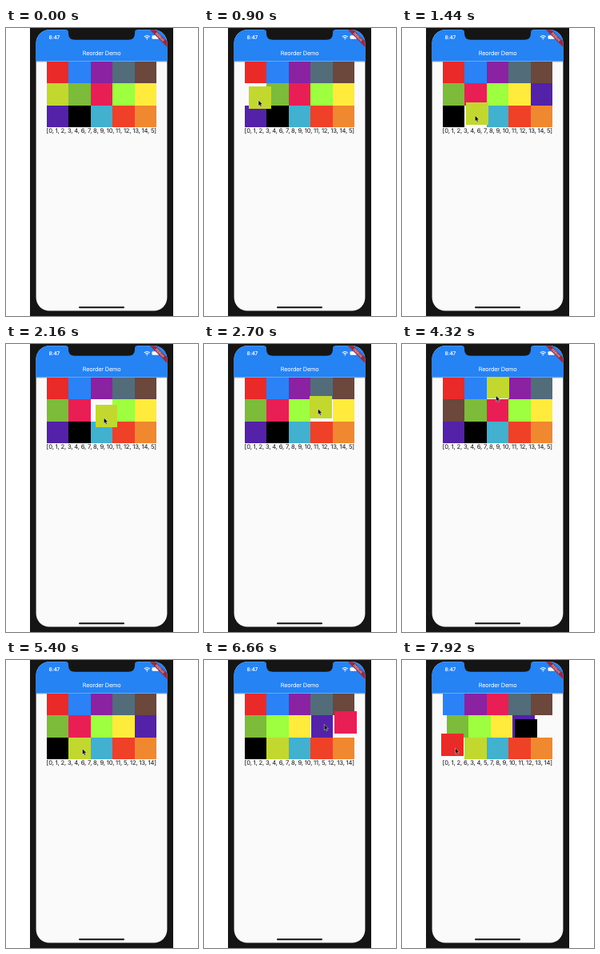
Write an HTML page that moves like this. It is 240 px wide and 360 px high and loops after 8 s.

```html
<!DOCTYPE html>
<html lang="en">
<head>
<meta charset="utf-8">
<title>Reorder Demo</title>
<style>
  html, body { margin: 0; width: 100%; height: 100%; overflow: hidden; background: #fff; }
  svg { display: block; width: 240px; height: 360px; }
  text { font: 7.65px Inter, "Open Sans", sans-serif; letter-spacing: -.19px; text-rendering: geometricPrecision; }
  .title { font-size: 7.35px; }
  .time { font-size: 6.5px; font-weight: 600; }
  .debug { font-size: 4px; font-weight: 700; letter-spacing: 0; }
  #tiles { shape-rendering: crispEdges; }
</style>
</head>
<body>
<svg viewBox="0 0 240 360">
  <defs>
    <clipPath id="screen"><rect x="37.6" y="2.2" width="163.800" height="351.300" rx="16.500"/></clipPath>
    <linearGradient id="shade" x2="0" y2="1">
      <stop stop-color="#000" stop-opacity=".28"/>
      <stop offset="1" stop-color="#000" stop-opacity="0"/>
    </linearGradient>
  </defs>
  <rect x="30" width="179" height="360" fill="#151515"/>
  <g clip-path="url(#screen)">
    <rect x="37" width="165" height="360" fill="#fafafa"/>
    <rect x="37" width="165" height="41.5" fill="#2583f3"/>
    <rect x="37" y="41.5" width="165" height="2" fill="url(#shade)"/>
    <text class="title" x="119.6" y="33.6" text-anchor="middle" fill="#fff">Reorder Demo</text>
    <text class="time" x="53.6" y="14" fill="#fff">8:47</text>
    <g fill="none" stroke="#fff" stroke-width="1.1">
      <path d="M173 11q3.3-3 6.6 0M174.5 12.4q1.8-1.6 3.6 0"/>
      <path d="M176.3 13.2v1.2"/>
    </g>
    <rect x="182.5" y="9.3" width="8.5" height="4.4" rx="1.2" fill="#fff"/>
    <g transform="translate(201 2.5) rotate(45)">
      <rect x="-25" y="9.8" width="50" height="5" fill="#982a40"/>
      <text class="debug" y="13.7" text-anchor="middle" fill="#e6c4cc">DEBUG</text>
    </g>
    <rect x="91" y="348.3" width="57" height="1.9" rx=".95" fill="#111"/>
  </g>
  <path d="M75 0V2.200q3 0 3 3V7q0 7.800 8 7.800h67q8 0 8-7.800V5.200q0-3 3-3V0z" fill="#151515"/>
  <text id="list" x="50.6" y="131.2" fill="#111"></text>
  <g id="tiles"></g>
  <path id="cursor" d="M0 0V7.2L1.6 5.700 2.7 8.2 4 7.600 2.900 5.200H5.100z" fill="#000" stroke="#fff" stroke-width=".45"/>
</svg>
<script>
const LOOP = 8000, STEP = 180, SHIFT = 200, TICK = 5;
const CELL = 27.5, COLS = 5, LEFT = 50.8, TOP = 41.6;
const colors = ['#e92a28', '#2a82f6', '#8a22a2', '#526c7a', '#6b473c',
  '#c2d82f', '#7dbb3a', '#e91e55', '#9dff3f', '#ffeb3b',
  '#5322a8', '#000', '#42b0cf', '#ee4128', '#f08830'];

const $ = id => document.getElementById(id);
const mix = (a, b, k) => a.map((v, i) => v + (b[i] - v) * k);
const smooth = k => k * k * (3 - 2 * k);
const place = (el, [x, y]) => el.setAttribute('transform', `translate(${x} ${y})`);
const identity = () => colors.map((_, i) => i);
const slot = i => [LEFT + CELL * (i % COLS), TOP + CELL * Math.floor(i / COLS)];

// Slot under the middle of a tile
const slotAt = ([x, y]) => {
  const cell = v => Math.floor(v / CELL + .5);
  return cell(y - TOP) * COLS + cell(x - LEFT);
};

// Each path glides through a few points: [time, [x, y]]
const drags = [
  { tile: 5, path: [[700, slot(5)], [1440, [80, 93]], [2700, [132, 65]], [4320, [106, 40.5]], [5220, slot(11)]] },
  { tile: 7, path: [[5940, slot(6)], [6660, [163, 64]], [7020, slot(3)]] },
  { tile: 0, path: [[7311, slot(0)], [7920, [49, 92]]] }
];
const pointer = [[700, [63, 86]], [1440, [91.3, 109.5]], [2700, [142.5, 81]], [4320, [117.5, 64.5]],
  [5220, [95.5, 111]], [5400, [95.5, 111]], [5940, [95, 86]], [6660, [150.3, 80.5]],
  [7311, [68, 60]], [7920, [66.5, 110]]];

function glide(path, t) {
  const i = path.findIndex(([time]) => time > t);
  if (i < 0) return path[path.length - 1][1];
  if (i === 0) return path[0][1];
  const [[t0, a], [t1, b]] = [path[i - 1], path[i]];
  return mix(a, b, smooth((t - t0) / (t1 - t0)));
}

function move(order, from, to) {
  order.splice(to, 0, order.splice(from, 1)[0]);
  return order;
}

const at = (s, t) => mix(s.from, s.to, Math.min(1, (t - s.start) / SHIFT));

// Replays the drags up to t: a dragged tile takes the slot it hovers, the others slide aside
function replay(t) {
  const order = identity();
  const state = order.map(i => ({ from: slot(i), to: slot(i), index: i, start: -SHIFT }));
  let list = move(identity(), 5, 14), held = -1;

  for (const { tile, path } of drags) {
    const begin = path[0][0], end = path[path.length - 1][0];
    if (t < begin) break;
    const first = order.indexOf(tile);
    for (let now = begin; now <= Math.min(t, end); now += TICK) {
      const target = slotAt(glide(path, now));
      if (target === order.indexOf(tile)) continue;
      move(order, order.indexOf(tile), target);
      order.forEach((id, i) => {
        if (state[id].index !== i) state[id] = { from: at(state[id], now), to: slot(i), index: i, start: now };
      });
    }
    held = t < end || tile === 0 ? tile : -1;
    if (held < 0) list = move(identity(), first, order.indexOf(tile));
  }

  const spots = state.map(s => at(s, t));
  if (held >= 0) spots[held] = glide(drags.find(d => d.tile === held).path, t);
  return { spots, list, held };
}

const tiles = colors.map(color => {
  const el = document.createElementNS('http://www.w3.org/2000/svg', 'rect');
  el.setAttribute('width', CELL);
  el.setAttribute('height', CELL);
  el.setAttribute('fill', color);
  return el;
});

function draw(t) {
  const { spots, list, held } = replay(t);
  tiles.forEach((el, i) => place(el, spots[i]));
  $('tiles').replaceChildren(...tiles);
  if (held >= 0) $('tiles').append(tiles[held]);
  $('list').textContent = `[${list.join(', ')}]`;
  $('cursor').style.display = t ? '' : 'none';
  place($('cursor'), glide(pointer, t));
}

let last = -1;
function tick() {
  const t = Math.floor(performance.now() % LOOP / STEP) * STEP;
  if (t !== last) draw(last = t);
  requestAnimationFrame(tick);
}
tick();
</script>
</body>
</html>
```
